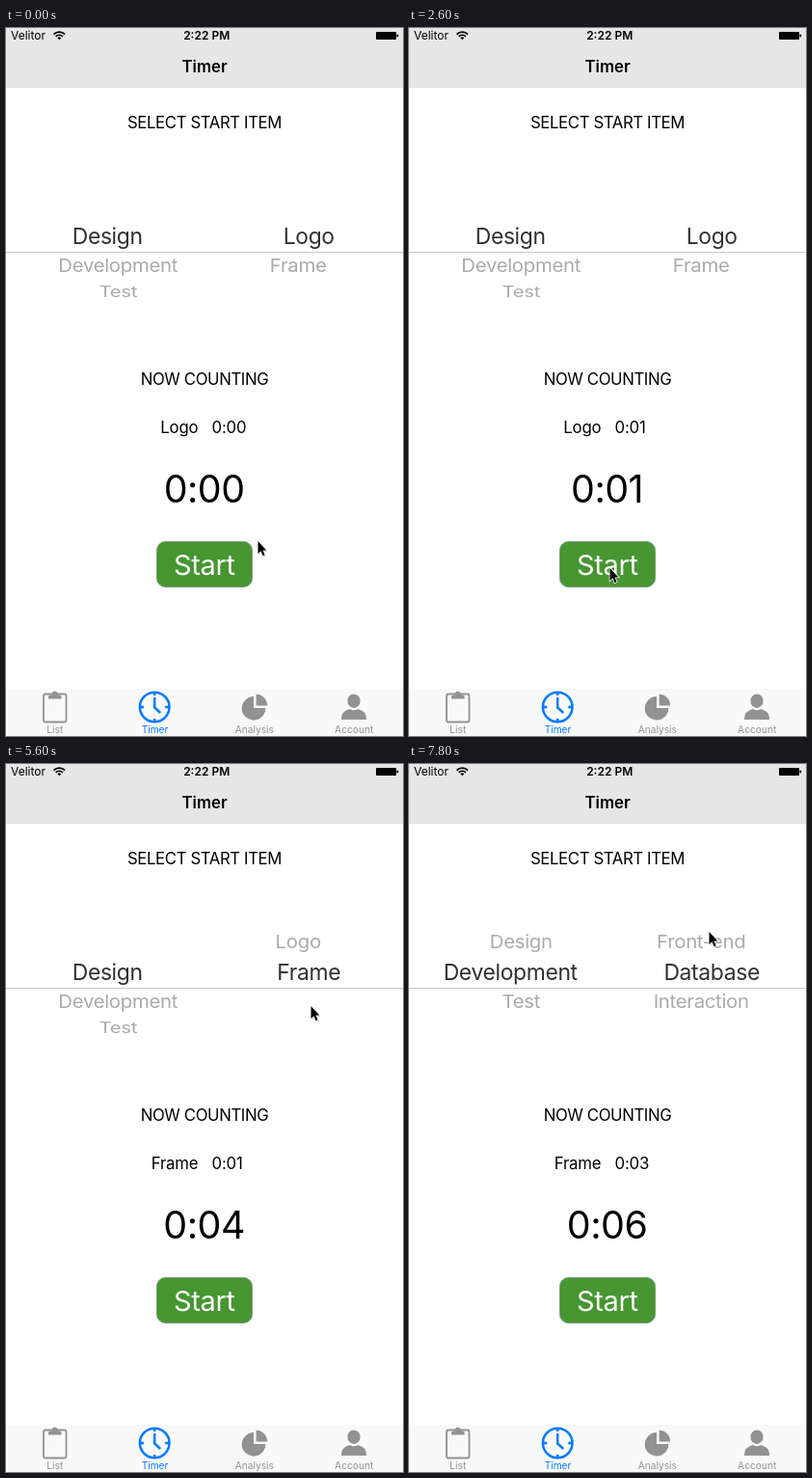
Animation, 412 px wide and 734 px high, one loop 8 s. Source, as an HTML page:

```html
<!DOCTYPE html>
<html lang="en">
<head>
<meta charset="utf-8">
<title>Timer</title>
<style>
  html, body { margin: 0; width: 100%; height: 100%; overflow: hidden; background: #fff; }
  svg { display: block; width: 412px; height: 734px; font-family: Inter, "Open Sans", sans-serif; }
  .mid { text-anchor: middle; }
  .end { text-anchor: end; }
  .bold { font-weight: 600; }
  .status { font-size: 12px; }
  .body { font-size: 16.8px; }
  .caps { letter-spacing: -.4px; }
  .tight { letter-spacing: -.2px; }
  .clock { font-size: 39.4px; letter-spacing: -.5px; }
  .button { font-size: 29px; letter-spacing: -.4px; fill: #fff; }
  .row { font-size: 22.9px; letter-spacing: -.35px; text-anchor: middle; }
  .tab { font-size: 10.2px; text-anchor: middle; }
  .gray { fill: #929292; }
  .blue { fill: #007aff; }
</style>
</head>
<body>
<svg viewBox="0 0 412 734">
  <rect width="412" height="62" fill="#e6e6e6"/>
  <text class="status" x="5" y="12.4">Velitor</text>
  <g transform="translate(55.3 12)" fill="none" stroke="#000" stroke-width="1.7">
    <path d="M-5.8-5.4A8 8 0 0 1 5.8-5.4M-3.6-3.2A5 5 0 0 1 3.6-3.2"/>
    <path d="M0 .2L-1.9-1.7A2.7 2.7 0 0 1 1.9-1.7Z" fill="#000" stroke="none"/>
  </g>
  <text class="status bold mid" x="208.2" y="12.4">2:22 PM</text>
  <rect x="384" y="4" width="21" height="8" rx="1"/>
  <rect x="405.5" y="6.4" width="1.6" height="3.2" rx=".8"/>
  <text class="body bold mid" x="206" y="46">Timer</text>

  <text class="body caps mid" x="206" y="103.5">SELECT START ITEM</text>
  <path d="M0 232.5H412" stroke="#c8c8c8"/>
  <g id="picker"></g>

  <text class="body caps mid" x="206" y="370">NOW COUNTING</text>
  <text class="body tight end" id="item" x="199.4" y="420"></text>
  <text class="body tight" id="itemTime" x="213.6" y="420"></text>
  <text class="clock mid" id="total" x="205.6" y="492"></text>

  <rect x="156.5" y="532.5" width="99" height="47" rx="9" fill="#469632" stroke="#7a9a72"/>
  <text class="button mid" id="start" x="205.8" y="567">Start</text>

  <rect y="685" width="412" height="49" fill="#f9f9f9"/>
  <rect x="39" y="690.5" width="23.5" height="29" rx="2" fill="none" stroke="#929292" stroke-width="1.8"/>
  <path class="gray" d="M44 695.5V692.5L47.5 691Q48 687.5 50.7 687.5T54 691L57.5 692.5V695.5Z"/>
  <g fill="none" stroke="#007aff" stroke-width="2.5">
    <circle cx="154.2" cy="704" r="15.3"/>
    <path d="M154.2 694V704.5L160.2 710M154.2 689V692M154.2 716V719M139.2 704H143.2M165.2 704H169.2"/>
  </g>
  <g class="gray">
    <path d="M257 705V693A12.3 12.3 0 1 0 269.3 705Z"/>
    <path d="M259.6 702.4V690.8A11.6 11.6 0 0 1 271.2 702.4Z"/>
    <ellipse cx="361" cy="697.7" rx="6.6" ry="7.2"/>
    <path d="M348 717C348 709.5 351 708 357 706Q361 708.5 365 706C371 708 374 709.5 374 717Z"/>
  </g>
  <text class="tab gray" x="50.8" y="731">List</text>
  <text class="tab blue" x="154.5" y="731">Timer</text>
  <text class="tab gray" x="257.8" y="731">Analysis</text>
  <text class="tab gray" x="361.2" y="731">Account</text>

  <g id="cursor">
    <path d="M1.5 2.5V15.5L4.5 13L6.6 17.8L9 17L6.8 12H10.5Z" opacity=".18"/>
    <path d="M.5 1V14L3.5 11.3L5.6 16.2L7.6 15.3L5.5 10.5H9.3Z" stroke="#fff" stroke-width="1.5" paint-order="stroke"/>
  </g>
</svg>
<script>
const LOOP = 8000, STEP = 100;
const PRESS_AT = 1400, START_AT = 1600, FRAME_AT = 5400, RELOAD_AT = 7300;
const SCROLL_TIME = 300;
const ANGLE = 20.7 * Math.PI / 180, RADIUS = 87.6;

const LEFT = ['Design', 'Development', 'Test'];
const DESIGN_ITEMS = ['Logo', 'Frame'];
const DEVELOPMENT_ITEMS = ['Front-end', 'Database', 'Interaction'];

const HOME = { x: 261, y: 531 };
const MOVES = [
  { from: 0, to: 800, x: 276, y: 535 },
  { from: 800, to: START_AT, x: 208, y: 559 },
  { from: 3700, to: 3800, x: 297, y: 472 },
  { from: 3800, to: 4200, x: 372, y: 300 },
  { from: 4200, to: 5000, x: 316, y: 250 },
  { from: 5900, to: 6800, x: 154, y: 245 },
  { from: RELOAD_AT, to: 7800, x: 311, y: 173 }
];

const byId = id => document.getElementById(id);
const clamp = x => Math.min(1, Math.max(0, x));
const mix = (a, b, k) => a + (b - a) * k;
const progress = (t, from, to) => clamp((t - from) / (to - from));
const smooth = k => k * k * (3 - 2 * k);
const scrollTo = (t, end) => 1 - (1 - progress(t, end - SCROLL_TIME, end)) ** 2;
const clockText = s => '0:' + String(s).padStart(2, '0');

function cursorAt(t) {
  return MOVES.reduce((p, move) => {
    const k = smooth(progress(t, move.from, move.to));
    return { x: mix(p.x, move.x, k), y: mix(p.y, move.y, k) };
  }, HOME);
}

// Rows sit on a wheel; the selected one is larger and further from the middle.
function wheel(items, scroll, x, inward) {
  return items.map((label, i) => {
    const d = i - scroll, near = clamp(Math.abs(d));
    const cx = x + inward * 11 * near;
    const cy = 215.5 + RADIUS * Math.sin(d * ANGLE);
    const sx = mix(1, .89, near), sy = sx * Math.cos(d * ANGLE);
    const shade = Math.round(mix(48, 170, near));
    return `<text class="row" y="8.3" fill="rgb(${shade},${shade},${shade})"
      transform="translate(${cx} ${cy}) scale(${sx} ${sy})">${label}</text>`;
  }).join('');
}

function draw(t) {
  const seconds = Math.max(0, Math.floor((t - START_AT) / 1000));
  const onFrame = t >= FRAME_AT;
  byId('item').textContent = onFrame ? 'Frame' : 'Logo';
  byId('itemTime').textContent = clockText(onFrame ? seconds - 3 : seconds);
  byId('total').textContent = clockText(seconds);

  const rightItems = t < RELOAD_AT ? DESIGN_ITEMS : DEVELOPMENT_ITEMS;
  byId('picker').innerHTML =
    wheel(LEFT, scrollTo(t, RELOAD_AT), 105.2, 1) +
    wheel(rightItems, scrollTo(t, FRAME_AT), 314.2, -1);

  const alpha = t < PRESS_AT ? 1 : mix(.3, 1, progress(t, PRESS_AT + 100, PRESS_AT + 500));
  byId('start').setAttribute('opacity', alpha);

  const { x, y } = cursorAt(t);
  byId('cursor').setAttribute('transform', `translate(${x} ${y})`);
}

function tick() {
  draw(Math.floor(performance.now() % LOOP / STEP) * STEP);
  requestAnimationFrame(tick);
}
tick();
</script>
</body>
</html>
```
